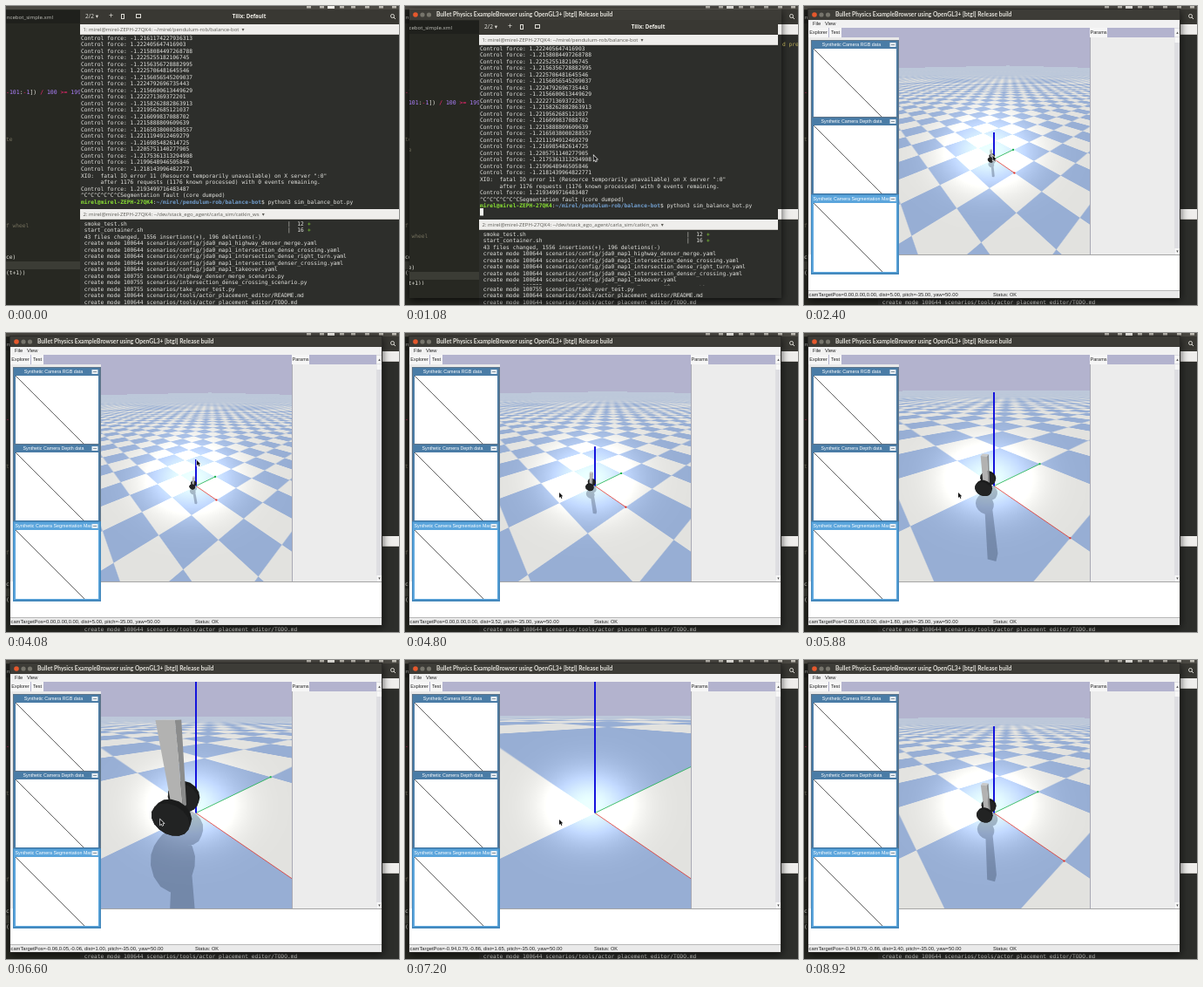
Recreate the animation shown at these times as an HTML page with a canvas. Size 451x343 px, loop 9 s.

```html
<!DOCTYPE html>
<html lang="en">
<head>
<meta charset="utf-8">
<title>Balance bot simulation</title>
<style>
html, body { margin: 0; width: 100%; height: 100%; overflow: hidden; background: #272822; }
canvas { display: block; width: 451px; height: 343px; }
</style>
</head>
<body>
<canvas id="stage" width="451" height="343"></canvas>
<script>
const ctx = document.getElementById('stage').getContext('2d');
const LOOP = 9000, STEP = 40;
const MONO = '"DejaVu Sans Mono", monospace';
const SANS = '"Open Sans", sans-serif';
const UI = '"Liberation Sans", Arial, sans-serif';
const HOST = 'mirel@mirel-ZEPH-27QK4';

function rect(x, y, w, h, color) {
  ctx.fillStyle = color;
  ctx.fillRect(x, y, w, h);
}

function text(s, x, y, size, color, family = UI, weight = 400, align = 'left') {
  ctx.font = `${weight} ${size}px ${family}`;
  ctx.textAlign = align;
  ctx.textBaseline = 'middle';
  ctx.fillStyle = color;
  ctx.fillText(s, x, y);
}

function line(x1, y1, x2, y2, color, width = 1) {
  ctx.strokeStyle = color;
  ctx.lineWidth = width;
  ctx.beginPath();
  ctx.moveTo(x1, y1);
  ctx.lineTo(x2, y2);
  ctx.stroke();
}

function dot(x, y, r, color) {
  ctx.fillStyle = color;
  ctx.beginPath();
  ctx.arc(x, y, r, 0, 7);
  ctx.fill();
}

function clipped(x, y, w, h, draw) {
  ctx.save();
  ctx.beginPath();
  ctx.rect(x, y, w, h);
  ctx.clip();
  draw();
  ctx.restore();
}

// Linear interpolation through [time, ...values] keys
function track(keys, t) {
  if (t <= keys[0][0]) return keys[0].slice(1);
  for (let i = 1; i < keys.length; i++) {
    const a = keys[i - 1], b = keys[i];
    if (t <= b[0]) {
      const k = (t - a[0]) / (b[0] - a[0]);
      return a.slice(1).map((v, j) => v + (b[j + 1] - v) * k);
    }
  }
  return keys[keys.length - 1].slice(1);
}

// ---- Desktop: editor and terminal ----
const ROW = 7.52, CODE = 6.26;
const forces = `-1.2161174227936313 1.222405647416903 -1.2158084497268788
1.2225255182106745 -1.2156356728882995 1.2225706481645546 -1.2156056545209037
1.2224792696735443 -1.2156600613449629 1.222271369372201 -1.2158262882863913
1.2219562685121037 -1.216099837088702 1.2215888809609639 -1.2165038000288557
1.2211194912469279 -1.216985482614725 1.2205751140277905 -1.2175361313294908
1.2199648946505846 -1.2181439964822771`.split(/\s+/).map(n => 'Control force: ' + n);
const log = [...forces,
  'XIO:  fatal IO error 11 (Resource temporarily unavailable) on X server ":0"',
  '      after 1176 requests (1176 known processed) with 0 events remaining.',
  'Control force: 1.2193499716483487',
  '^C^C^C^C^C^CSegmentation fault (core dumped)'];
const yaml = s => `100644 scenarios/config/jda0_map1_${s}.yaml`;
const created = [
  ...['highway_denser_merge', 'intersection_dense_crossing', 'intersection_dense_right_turn',
    'intersection_denser_crossing', 'takeover'].map(yaml),
  '100755 scenarios/highway_denser_merge_scenario.py',
  '100755 scenarios/intersection_dense_crossing_scenario.py',
  '100755 scenarios/take_over_test.py',
  '100644 scenarios/tools/actor_placement_editor/README.md',
  '100644 scenarios/tools/actor_placement_editor/TODO.md'];

function mono(s, x, y, color = '#e4e4e0', weight = 400, size = CODE) {
  text(s, x, y, size, color, MONO, weight);
}

// Consecutive coloured pieces of one line of code
function runs(pieces, x, y, size = CODE) {
  for (const [s, color, weight] of pieces) {
    mono(s, x, y, color, weight, size);
    x += ctx.measureText(s).width;
  }
}

function prompt(y) {
  runs([[HOST, '#8ae234', 700], [':', '#e4e4e0'],
    ['~/mirel/pendulum-rob/balance-bot', '#729fcf', 700],
    ['$ python3 sim_balance_bot.py', '#e4e4e0']], 86, y);
}

function editor() {
  const num = '#ae81ff', op = '#f92672', plain = '#e8e8e0', note = '#75715e';
  rect(0, 0, 86, 343, '#272822');
  rect(0, 5, 85, 15, '#1f201c');
  text('ncebot_simple.xml', 54, 13, 6.1, '#c4c4be', SANS, 400, 'right');
  runs([['-', op], ['101', num], [':', plain], ['-', op], ['1', num], ['])', plain],
    [' / ', op], ['100', num], [' >= ', op], ['199', num]], 0, 99.5, 6.5);
  mono('te', 0, 153, note);
  mono('f wheel', 0, 252, note);
  mono('ce)', 0, 288, plain);
  rect(0, 293, 85, 9, '#3b3c35');
  mono('(t+1))', 0, 306, plain);
}

function tabBar(y, label) {
  rect(85, y, 366, 12, '#efeeec');
  line(85, y + 11.5, 451, y + 11.5, '#c9c7c3');
  text(label + '  ▾', 88.5, y + 6, 6, '#5c5b55', SANS);
}

function panelIcons() {
  rect(0, 0, 451, 4, '#4b4943');
  [345, 360, 383, 396, 412, 428, 443].forEach(x => rect(x, 0, 5, 2.5, '#bdbab2'));
  rect(369, 0, 8, 3, '#f2f0ea');
}

function header() {
  rect(85, 4, 366, 17, '#393833');
  text('2/2 ▾', 91, 12, 6.6, '#e4e2dc', SANS);
  text('+', 120.5, 12, 9, '#e4e2dc', SANS, 400, 'center');
  ctx.strokeStyle = '#dcdad4';
  ctx.lineWidth = 1;
  ctx.strokeRect(132.5, 9.5, 3, 5);
  ctx.strokeRect(149.5, 9.5, 5, 4);
  text('Tilix: Default', 279, 12, 6.1, '#f0eee8', SANS, 700, 'center');
  ctx.beginPath();
  ctx.arc(443.5, 11.5, 2, 0, 7);
  ctx.stroke();
  line(445, 13, 447, 15, '#dcdad4');
}

function desktop(entered, caret) {
  editor();
  rect(85, 0, 366, 343, '#2d2e2b');
  header();
  tabBar(21, `1: ${HOST}: ~/mirel/pendulum-rob/balance-bot`);
  const top = 37 - (entered ? ROW : 0);
  log.forEach((s, i) => { if (!entered || i) mono(s, 86, top + i * ROW); });
  prompt(top + log.length * ROW);
  if (entered) rect(86, 220, 4, 8.5, '#f2f2ee');
  else if (caret) rect(400, 219.5, 5, 9, '#f2f2ee');
  tabBar(233, `2: ${HOST}: ~/dev/stack_ego_agent/carla_sim/catkin_ws`);
  [['smoke_test.sh', 12], ['start_container.sh', 16]].forEach(([name, n], i) => {
    const y = 250 + i * ROW;
    mono(' ' + name, 86, y);
    mono('|  ' + n, 323, y);
    mono('+', 346, y, '#8ae234');
  });
  mono(' 43 files changed, 1556 insertions(+), 196 deletions(-)', 86, 265);
  created.forEach((s, i) => mono(' create mode ' + s, 86, 272.6 + i * ROW));
  panelIcons();
}

// ---- Simulator view ----
const VX = 109, VY = 25, VW = 219, VH = 260;
const CX = 218, CY = 175.5, F = 159.5;
const rad = Math.PI / 180;
const C = Math.cos(35 * rad), S = Math.sin(35 * rad);
const YC = Math.cos(50 * rad), YS = Math.sin(50 * rad);
const view = ctx.createImageData(VW, VH);
const WHITE = [226, 226, 223], BLUE = [151, 174, 212], SKY = [179, 179, 206];
let viewDist = null;

const saw = v => Math.abs(v / 2 - Math.floor(v / 2) - 0.5);
const wave = (p, w) => 2 * (saw(p - w / 2) - saw(p + w / 2)) / w;

// Filtered checkerboard of unit tiles, with a highlight fixed to the screen
function paintFloor(d) {
  if (d === viewDist) return;
  viewDist = d;
  const px = view.data;
  for (let j = 0, o = 0; j < VH; j++) {
    const Y = VY + j + 0.5, b = (CY - Y) / F, down = S - b * C;
    const t = d * S / down, h = -d * C + t * (C + b * S);
    const wr = t / F, wh = (t * C / down * (C + b * S) + t * S) / F;
    const wx = (YC * wr + YS * wh) * 0.75, wy = (YS * wr + YC * wh) * 0.75;
    for (let i = 0; i < VW; i++, o += 4) {
      const X = VX + i + 0.5, r = (X - CX) / F * t;
      const x = YC * r - YS * h, y = YS * r + YC * h;
      const floor = d > 0 && down > 0 && Math.abs(x) < 100 && Math.abs(y) < 100;
      let blue = 0, glow = 0;
      if (floor) {
        blue = 0.5 - 0.5 * wave(x, wx) * wave(y, wy);
        glow = 85 * Math.exp(-(((X - 212) / 50) ** 2) - ((Y - 167) / 40) ** 2);
      }
      for (let c = 0; c < 3; c++)
        px[o + c] = floor ? WHITE[c] + (BLUE[c] - WHITE[c]) * blue + glow : SKY[c];
      px[o + 3] = 255;
    }
  }
}

// Points are [right, ahead, height], seen from distance d
function project([r, h, z], d) {
  const depth = d + h * C - z * S, k = F / depth;
  return [CX + r * k, CY - (h * S + z * C) * k, depth];
}

function hull(pts) {
  const sorted = [...pts].sort((a, b) => a[0] - b[0] || a[1] - b[1]);
  const half = list => {
    const out = [];
    for (const p of list) {
      while (out.length > 1) {
        const [a, b] = out.slice(-2);
        if ((b[0] - a[0]) * (p[1] - a[1]) - (b[1] - a[1]) * (p[0] - a[0]) > 0) break;
        out.pop();
      }
      out.push(p);
    }
    return out.slice(0, -1);
  };
  return [...half(sorted), ...half(sorted.reverse())];
}

function addPath(path, pts) {
  pts.forEach((p, i) => i ? path.lineTo(p[0], p[1]) : path.moveTo(p[0], p[1]));
  path.closePath();
}

function solid(points, d, color, convex) {
  const pts = points.map(p => project(p, d));
  if (pts.some(p => p[2] < 0.05)) return;
  const path = new Path2D();
  addPath(path, convex ? hull(pts) : pts);
  ctx.fillStyle = color;
  ctx.fill(path);
}

// Offsets across (p) and along (a) the axle
const place = ([r, h, z], p, a, up = 0) =>
  [r + 0.97 * p + 0.24 * a, h - 0.24 * p + 0.97 * a, z + up];

function rim(center, a) {
  return Array.from({ length: 16 }, (_, i) => {
    const q = i * Math.PI / 8;
    return place(center, 0.098 * Math.cos(q), a, 0.098 * Math.sin(q));
  });
}

function robot(t, d) {
  const sway = Math.sin(2 * Math.PI * (t - 5120) / 740);
  const roll = 0.01 * sway, lean = -0.014 * sway;
  const near = [-0.12 + roll, -0.19, 0.1], far = [-0.076 + roll, 0.03, 0.1];
  const base = [-0.093 + roll, -0.08, 0.1], tip = [-0.087 + lean, -0.2, 0.505];
  const ring = c => [[-0.032, -0.03], [0.032, -0.03], [0.032, 0.03], [-0.032, 0.03]]
    .map(([p, a]) => place(c, p, a));
  const lo = ring(base), hi = ring(tip);
  const wheels = [far, near].map(c => [rim(c, -0.02), rim(c, 0.02)]);

  const shade = new Path2D();
  const parts = [[...lo, ...hi], ...wheels.map(w => w.flat())];
  parts.forEach(part => {
    const pts = part.map(([r, h, z]) => project([r + 0.16 * z, h - 1.43 * z, 0], d));
    if (pts.every(p => p[2] > 0.05)) addPath(shade, hull(pts));
  });
  ctx.fillStyle = 'rgba(45,58,82,0.33)';
  ctx.fill(shade);

  const wheel = ([front, back]) => {
    solid([...front, ...back], d, '#1b1c1c', true);
    solid(front, d, '#222323');
  };
  wheel(wheels[0]);
  solid(hi, d, '#c9c9c8');
  solid([lo[1], lo[2], hi[2], hi[1]], d, '#8b8c8c');
  solid([lo[0], lo[1], hi[1], hi[0]], d, '#b2b2b1');
  wheel(wheels[1]);
}

function axis(end, d, color, width) {
  let k = 1;
  const gain = project(end, d)[2] - d;
  if (d + gain < 0.05) k = (0.05 - d) / gain;
  const a = project([0, 0, 0], d), b = project(end.map(v => v * k), d);
  line(a[0], a[1], b[0], b[1], color, width);
  if (k === 1) rect(b[0] - 1, b[1] - 1, 2, 2, color);
}

function scene(t, d) {
  paintFloor(d);
  ctx.putImageData(view, VX, VY);
  if (d < 0.06) return;
  clipped(VX, VY, VW, VH, () => {
    axis([YC, -YS, 0], d, '#e02a22', 0.75);
    axis([YS, YC, 0], d, '#16b04a', 0.8);
    axis([0, 0, 1], d, '#1414dc', 2);
    robot(t, d);
  });
}

// ---- Simulator window ----
function dropShadow() {
  ctx.save();
  ctx.shadowColor = 'rgba(0,0,0,0.7)';
  ctx.shadowBlur = 9;
  ctx.shadowOffsetY = 3;
  rect(5, 3, 427, 332, '#2d2e2b');
  ctx.restore();
}

function titleBar() {
  rect(5, 3, 427, 13, '#3d3c37');
  line(5, 3.5, 432, 3.5, '#55534c');
  dot(12, 10, 2.8, '#e5582c');
  dot(20, 10, 2.6, '#77756c');
  dot(27.5, 10, 2.6, '#77756c');
  text('Bullet Physics ExampleBrowser using OpenGL3+ [btgl] Release build',
    36, 10, 6.7, '#e6e4dd', 'Lato, sans-serif', 700);
}

function cameraPanel(y, h, title, active) {
  const blue = active ? '#5ba5dc' : '#4a7ca6';
  rect(8, y, 101, h + 1, active ? '#4388bd' : '#5c7388');
  rect(9, y + 1, 98.5, h - 2, blue);
  rect(11, y + 10, 95, h - 12, '#fff');
  clipped(10, y, 88, 11, () => {
    if (active) text(title, 10.5, y + 5.5, 5.35, '#fff');
    else text(title, 54.5, y + 5.5, 5.35, '#fff', UI, 400, 'center');
  });
  rect(98.5, y + 3, 7, 5, '#e8eef3');
  line(100, y + 5.5, 104, y + 5.5, '#8796a3');
  clipped(11, y + 10, 95, h - 12, () => line(10.5, y + 9.5, 92, y + 91, '#3a3a3a', 0.8));
}

function tab(label, x, w, h = 11) {
  rect(x, 25, w, h, '#f6f6f6');
  text(label, x + w / 2, 30.5, 5.5, '#222', UI, 400, 'center');
}

function simulator(t, dist, shift) {
  dropShadow();
  titleBar();
  rect(5, 16, 427, 9, '#f1f1f1');
  text('File', 10, 20.5, 5.8, '#222');
  text('View', 24, 20.5, 5.8, '#222');
  rect(5, 25, 427, 11, '#b3b3ce');
  rect(5, 36, 104, 250, '#e9e9e9');
  rect(5, 285, 427, 41, '#fff');
  tab('Explorer', 5, 23);
  tab('Test', 29, 14);
  scene(t, dist - shift);

  cameraPanel(39, 90, 'Synthetic Camera RGB data');
  cameraPanel(127, 90, 'Synthetic Camera Depth data');
  cameraPanel(216, 91, 'Synthetic Camera Segmentation Mask', true);

  rect(328, 36, 104, 249, '#ececec');
  line(328.5, 25, 328.5, 285, '#a9a9b4');
  tab('Params', 328, 20);
  rect(425, 25, 7, 260, '#dedee2');
  [[26, 9], [36, 6], [278, 7]].forEach(([y, h]) => rect(425.5, y, 6, h, '#f7f7f7'));
  text('▴', 428.5, 31, 5, '#555', UI, 400, 'center');
  text('▾', 428.5, 281.5, 5, '#555', UI, 400, 'center');
  line(109, 285.5, 432, 285.5, '#a5a5a5');

  rect(5, 326, 427, 9, '#eaeaea');
  line(5, 326.5, 432, 326.5, '#b8b8b8');
  const num = v => (Math.abs(v) < 0.005 ? 0 : v).toFixed(2);
  const pos = [-YS * C, YC * C, -S].map(v => num(v * shift)).join(',');
  clipped(5, 326, 427, 9, () => {
    text(`camTargetPos=${pos}, dist=${num(dist)}, pitch=-35.00, yaw=50.00`, 5.5, 331, 5.8, '#222');
    text('Status: OK', 217, 331, 5.6, '#222');
  });
  ctx.strokeStyle = '#2b2a27';
  ctx.lineWidth = 1;
  ctx.strokeRect(4.5, 3.5, 427, 332);
}

// The new window first shows stale screen content
function emptyWindow() {
  dropShadow();
  clipped(5, 16, 427, 319, () => desktop(true));
  clipped(5, 16, 423, 304, () => {
    ctx.translate(0, 12);
    desktop(true);
  });
  text('d prec', 433, 44, CODE, '#b9ad58', MONO);
  titleBar();
}

function pointer(x, y) {
  const pts = [[0, 0], [0, 7], [1.7, 5.6], [2.8, 8.2], [4, 7.6], [2.9, 5.2], [5, 5]];
  const path = new Path2D();
  addPath(path, pts.map(p => [x + p[0] * 0.85, y + p[1] * 0.85]));
  ctx.lineWidth = 1.2;
  ctx.strokeStyle = '#fff';
  ctx.stroke(path);
  ctx.fillStyle = '#111';
  ctx.fill(path);
}

const zoom = [[4560, 5, 0], [5080, 1.8, 0], [6360, 1.8, 0], [6560, 1, 0], [6600, 1, 0.1],
  [6720, 1, 1.5], [6960, 1, 1.5], [7840, 3.4, 1.5]];
const mouse = [[2640, 216.5, 171.5], [3000, 176, 142], [3360, 188, 122], [3640, 182, 124],
  [3840, 150, 150], [4080, 219, 146], [4280, 250, 146], [4480, 232, 168], [4760, 177, 183],
  [7840, 177, 183], [8080, 411, 237]];

function draw(t) {
  desktop(t >= 560, t >= 280);
  if (t < 1040) return;
  if (t < 1400) emptyWindow();
  else simulator(t, ...track(zoom, t));
  if (t < 8080) pointer(...track(mouse, t));
}

const start = performance.now();
function tick() {
  const t = (performance.now() - start) % LOOP;
  draw(Math.floor(t / STEP) * STEP);
  requestAnimationFrame(tick);
}
tick();
</script>
</body>
</html>
```
